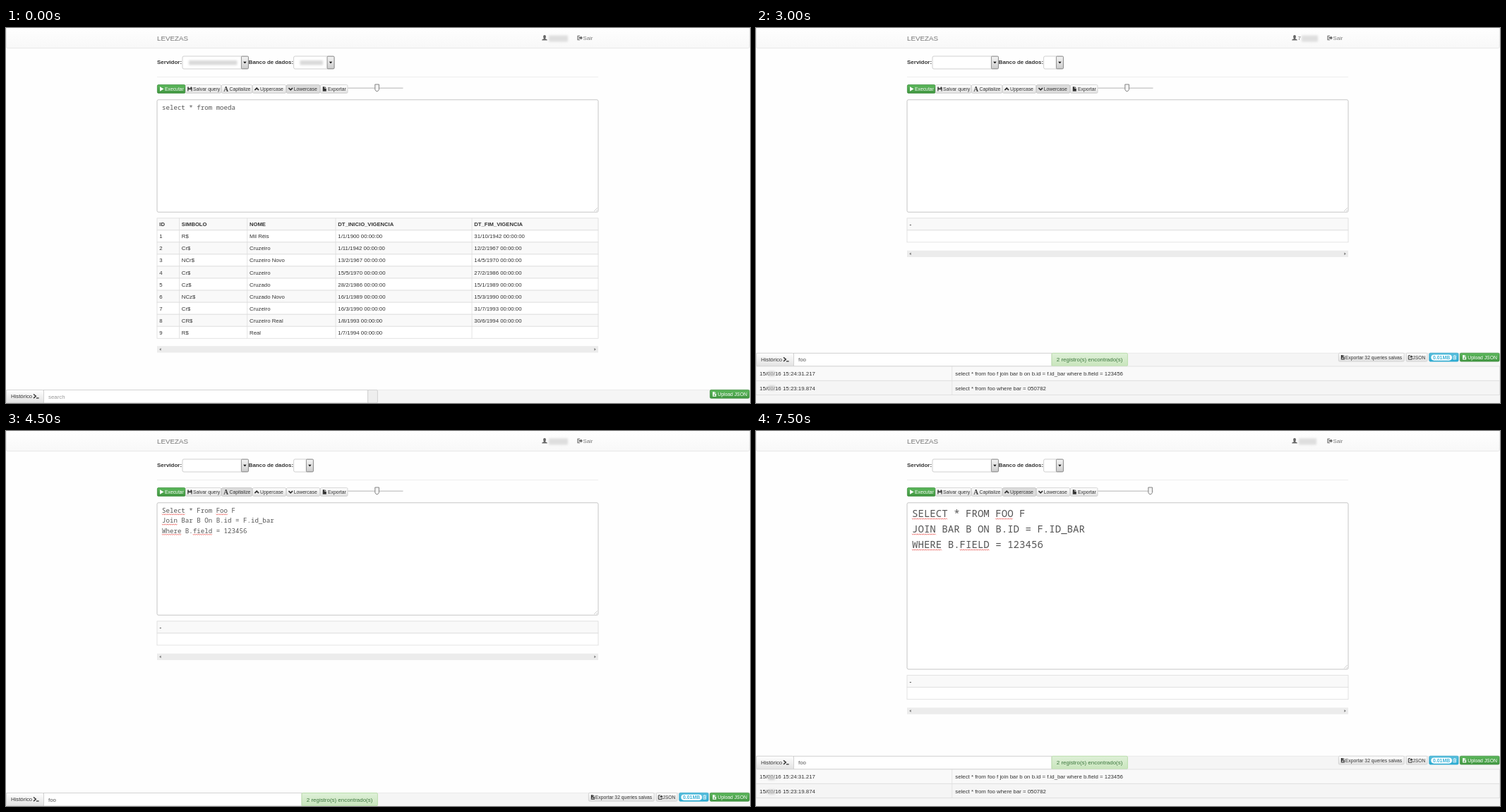
Recreate the animation shown at these times as an HTML page. Size 1054 by 532 pixels, loop 8 s.

```html
<!DOCTYPE html>
<html lang="pt">
<head>
<meta charset="utf-8">
<title>Consulta SQL</title>
<style>
html, body { margin: 0; width: 100%; height: 100%; overflow: hidden; background: #fefefe; }
svg { display: block; width: 100%; height: 100%; }
text { font-family: "Liberation Sans", Arial, sans-serif; }
.mono { font-family: "Noto Sans Mono", "DejaVu Sans Mono", monospace; }
.serif { font-family: "Liberation Serif", serif; }
</style>
</head>
<body>
<svg id="stage" viewBox="0 0 1054 532" preserveAspectRatio="none">
  <defs id="defs"></defs>
  <g id="view"></g>
</svg>
<script>
const LOOP = 8000, STEP = 1500;
const INK = '#333', LINE = '#ddd';

const GRADIENTS = {
  nav: ['#ffffff', '#f8f8f8'], plain: ['#ffffff', '#e2e2e2'],
  green: ['#5cb85c', '#419641'], blue: ['#5bc0de', '#2aabd2'],
  warn: ['#fcf8e3', '#f8efc0'], ok: ['#dff0d8', '#c8e5bc'], arrow: ['#f4f4f4', '#cccccc']
};
document.getElementById('defs').innerHTML =
  Object.entries(GRADIENTS).map(([id, [a, b]]) =>
    `<linearGradient id="${id}" x2="0" y2="1"><stop stop-color="${a}"/><stop offset="1" stop-color="${b}"/></linearGradient>`).join('') +
  '<filter id="soft" x="-20%" y="-50%" width="140%" height="200%"><feGaussianBlur stdDeviation="1.6"/></filter>';

const grad = id => `url(#${id})`;

const box = (x, y, x2, y2, fill, stroke = 'none', r = 0, w = 0.8) =>
  `<rect x="${x}" y="${y}" width="${x2 - x}" height="${y2 - y}" rx="${r}" fill="${fill}" stroke="${stroke}" stroke-width="${w}"/>`;

const path = (d, stroke, w = 1, fill = 'none') =>
  `<path d="${d}" stroke="${stroke}" stroke-width="${w}" fill="${fill}"/>`;

const shape = (d, fill) => `<path d="${d}" fill="${fill}" fill-rule="evenodd"/>`;

const at = (x, y, art) => `<g transform="translate(${x} ${y})">${art}</g>`;

// y is the middle of the capitals
const label = (x, y, s, size = 7.85, fill = INK, extra = '') =>
  `<text x="${x}" y="${y + size * 0.36}" font-size="${size}" fill="${fill}" ${extra}>${s}</text>`;

const bold = (x, y, s, size) => label(x, y, s, size, INK, 'font-weight="bold"');

const smudge = (x, y, x2, y2, fill) =>
  `<rect x="${x}" y="${y}" width="${x2 - x}" height="${y2 - y}" fill="${fill}" filter="url(#soft)"/>`;

// icons are centred on 0,0
const icon = {
  play: c => shape('M-2.6-3.2L3 0L-2.6 3.2Z', c),
  save: c => shape('M-3.2-3H2.4L3.2-2.2V3H-3.2ZM-1.6-3V-.9H1.6V-3ZM-2 .8V3H2V.8Z', c) + box(.3, -2.7, 1.2, -1.2, c),
  letter: c => `<text class="serif" x="-3.4" y="3" font-size="9.4" font-weight="bold" fill="${c}">A</text>`,
  up: c => path('M-2.8 1.6L0-1.2L2.8 1.6', c, 1.7),
  down: c => path('M-2.8-1.4L0 1.4L2.8-1.4', c, 1.7),
  file: c => shape('M-2.5-3.2H.2V-.6H2.6V3.2H-2.5ZM.8-3.2L2.6-1.2H.8Z', c),
  sheet: (c, mark) => icon.file(c) + path('M-1.5 2L0 .3L1.5 2M0 .5V2.5', mark, .8),
  user: c => shape('M-1.9-1.8A1.9 2.2 0 0 1 1.9-1.8C1.9-.4 1.3.3.9.9L3.7 2.4V3.6H-3.7V2.4L-.9.9C-1.3.3-1.9-.4-1.9-1.8Z', c),
  exit: c => path('M0-2.8H-3V2.8H0', c, 1.1) + shape('M-1.4-.9H1V-2.7L4 0L1 2.7V.9H-1.4Z', c),
  share: c => path('M.2-2.6H-2.7V2.8H2.2V1', c, 1) + shape('M-1.2 1C-1-1 .2-1.7 1.2-1.7V-3L3.6-1L1.2 1V-.3C.2-.3-.6 0-1.2 1Z', c),
  trash: c => path('M-2.5-2H2.5M-1-2.7H1M-1.9-1.4V2.8H1.9V-1.4M-.6-1V2M.7-1V2', c, .8),
  prompt: c => path('M-3.6-2.9L-.3-.1L-3.6 2.7', c, 1.4) + path('M.2 2.6H4', c, 1.3)
};

function button(x, x2, y, skin, art, textX, s, ink = INK) {
  const [fill, edge] = {
    plain: [grad('plain'), '#ccc'], active: ['#dcdcdc', '#c2c2c2'],
    green: [grad('green'), '#3e8f3e'], blue: [grad('blue'), '#28a4c9']
  }[skin];
  return box(x + .4, y, x2 - .4, y + 11.8, fill, edge, 1.5) + art + label(textX, y + 6, s, 6.8, ink);
}

function select(x, x2, blur) {
  const bx = x2 - 10;
  return box(x, 40, x2, 58, '#fff', '#c4c4c4', 2) +
    box(bx, 40.2, x2, 57.8, grad('arrow'), '#777', 1) +
    shape(`M${bx + 2.8} 47.8H${x2 - 2.8}L${x2 - 5} 50.6Z`, '#111') +
    (blur ? smudge(x + 9, 46, bx - 6, 52.5, '#d9d9d9') : '');
}

function header(sc) {
  const [ux, ux2] = sc.user;
  return box(.4, -3, 1053.4, 28.5, grad('nav'), '#e4e4e4', 2) +
    label(214, 14.6, 'LEVEZAS', 9.8, '#777') +
    at(763, 14, icon.user('#666')) +
    (sc.digit ? label(767.5, 14.3, sc.digit, 7.85, '#777') : '') +
    smudge(ux, 10.5, ux2, 19.5, '#dedede') +
    at(813, 14, icon.exit('#666')) + label(817.5, 14.3, 'Sair', 7.85, '#777') +
    bold(214, 48.5, 'Servidor:', 8) + bold(343.8, 48.5, 'Banco de dados:', 7.85) +
    select(250, 343.4, sc.server) + select(407.6, sc.server ? 465 : 435.4, sc.server) +
    path('M214 69.5H839', '#eee');
}

function toolbar(sc) {
  const y = 80.6, mid = 86.5;
  const tools = [
    [254, 305, 'save', 260.4, 265, 'Salvar query'],
    [305, 349, 'letter', 311.6, 316.5, 'Capitalize'],
    [349, 397, 'up', 355.2, 360, 'Uppercase'],
    [397, 445, 'down', 403.2, 407.8, 'Lowercase'],
    [445, 484.4, 'file', 451.2, 456, 'Exportar']
  ];
  return button(214, 254.4, y, 'green', at(220.6, mid, icon.play('#fff')), 225, 'Executar', '#fff') +
    tools.map(([x, x2, pic, px, tx, s]) =>
      button(x, x2, y, sc.active.includes(s) ? 'active' : 'plain', at(px, mid, icon[pic](INK)), tx, s)).join('') +
    path('M484.5 85.2H562.5', '#b4b4b4', 1) +
    shape(`M${sc.knob - 2.8} 80H${sc.knob + 2.8}V87.6L${sc.knob + 1} 89.8H${sc.knob - 1}L${sc.knob - 2.8} 87.6Z`, '#f4f4f4') +
    path(`M${sc.knob - 2.8} 80H${sc.knob + 2.8}V87.6L${sc.knob + 1} 89.8H${sc.knob - 1}L${sc.knob - 2.8} 87.6Z`, '#777', .9);
}

function squiggle(x, x2, y) {
  let d = `M${x} ${y}`;
  for (let i = 1, px = x + 1.35; px <= x2; i++, px += 1.35) d += `L${px.toFixed(2)} ${y + (i % 2 ? 1.5 : 0)}`;
  return path(d, '#e8534f', .75);
}

function editor(sc) {
  const big = sc.zoom, size = big ? 14.08 : 9.13, adv = size * .6;
  const first = big ? 121.8 : 116.2, pitch = big ? 22 : 14.25, bottom = sc.bottom;
  let out = box(214, 101.8, 839, bottom, '#fff', '#c6c6c6', 2, 1) +
    path(`M833 ${bottom - 1.2}L837.8 ${bottom - 6}M836 ${bottom - 1.2}L837.8 ${bottom - 3}`, '#bbb', .7);
  sc.code.forEach((line, row) => {
    const y = first + row * pitch;
    out += `<text class="mono" x="221" y="${y}" font-size="${size}" fill="#555">${line}</text>`;
    for (const m of line.matchAll(/[a-z]+/gi)) {
      if (sc.spell && /^(select|foo|where|join|field)$/i.test(m[0]))
        out += squiggle(221 + m.index * adv, 221 + (m.index + m[0].length) * adv, y + (big ? 2 : 1.4));
    }
  });
  return out;
}

const COINS = [
  ['ID', 'SIMBOLO', 'NOME', 'DT_INICIO_VIGENCIA', 'DT_FIM_VIGENCIA'],
  ['R$', 'Mil Réis', '1/1/1900', '31/10/1942'],
  ['Cr$', 'Cruzeiro', '1/11/1942', '12/2/1967'],
  ['NCr$', 'Cruzeiro Novo', '13/2/1967', '14/5/1970'],
  ['Cr$', 'Cruzeiro', '15/5/1970', '27/2/1986'],
  ['Cz$', 'Cruzado', '28/2/1986', '15/1/1989'],
  ['NCz$', 'Cruzado Novo', '16/1/1989', '15/3/1990'],
  ['Cr$', 'Cruzeiro', '16/3/1990', '31/7/1993'],
  ['CR$', 'Cruzeiro Real', '1/8/1993', '30/6/1994'],
  ['R$', 'Real', '1/7/1994', '']
];
const COLS = [214, 245.5, 341.7, 467, 660];

function table(sc) {
  const top = sc.bottom + 8.6, h = 17.05, rows = sc.table ? COINS.length : 2, end = top + rows * h;
  let out = '';
  for (let i = 0; i < rows; i++) {
    const y = top + i * h;
    out += box(214, y, 839, y + h, i % 2 ? '#fff' : '#f9f9f9', LINE);
    if (!sc.table) continue;
    const cells = i ? [i, ...COINS[i].map((s, k) => k > 1 && s ? s + ' 00:00:00' : s)] : COINS[0];
    cells.forEach((s, k) => out += (i ? label : bold)(COLS[k] + 3.3, y + h / 2 + .2, s, i ? 7.8 : 7.65));
  }
  if (sc.table) out += path(COLS.slice(1).map(x => `M${x} ${top}V${end}`).join(''), LINE, .8);
  else out += bold(217.4, top + 8.6, '-', 7.8);
  const bar = end + (sc.table ? 11 : 11.8), mid = bar + 4.6;
  return out + box(214, bar, 839, bar + 9.2, '#ececec') +
    shape(`M219.6 ${mid - 1.9}V${mid + 1.9}L217.2 ${mid}ZM833.4 ${mid - 1.9}V${mid + 1.9}L835.8 ${mid}Z`, '#777');
}

function history(sc) {
  const y = sc.open ? 461.3 : 513.5, mid = y + 9.2, small = y + 6;
  const [split, msg, skin, edge, ink] = sc.note;
  let out = box(0, y, 1054, 532, '#f5f5f5') + path(`M0 ${y}H1054`, '#e6e6e6', .8) +
    box(.4, y, 53.5, y + 18.4, grad('plain'), '#ccc', 2) +
    label(7, mid, 'Histórico', 7.75) + at(42.6, mid - .3, icon.prompt(INK)) +
    box(53.5, y, split, y + 18.4, '#fff', '#ccc') +
    label(60, mid, sc.find || 'search', 7.9, sc.find ? '#555' : '#999') +
    box(split, y, 526.4, y + 18.4, skin, edge, 1.5) +
    label(split + 6.8, mid, msg, sc.find ? 7.95 : 7.78, ink);
  if (sc.saved) {
    out += button(825, 918.6, y - .1, 'plain', at(831.3, small, icon.sheet(INK, '#fff')), 834.8, `Exportar ${sc.saved} queries salvas`) +
      button(920.8, 951.4, y - .1, 'plain', at(927, small, icon.share(INK)), 930.3, 'JSON') +
      button(953.4, 995.4, y - .1, 'blue', box(956.4, y + 2.2, 986, y + 10.4, '#fff', 'none', 4.1) +
        label(959, small + .3, '0.01MB', 6.9, '#3db3d8', 'font-weight="bold"') +
        at(989.8, small, icon.trash('#e4f5fb')), 0, '');
  }
  out += button(997, 1053.4, y - .1, 'green', at(1003.6, small, icon.sheet('#fff', '#449d44')), 1008.3, 'Upload JSON', '#fff');
  if (sc.open) {
    const logs = [
      ['15:24:31.217', 'select * from foo f join bar b on b.id = f.id_bar where b.field = 123456'],
      ['15:23:19.874', 'select * from foo where bar = 050782']
    ];
    logs.forEach(([time, query], i) => {
      const top = 480 + i * 20.3, c = top + 10.4;
      out += box(0, top, 1053.4, top + 20.3, i ? '#f5f5f5' : '#f9f9f9', LINE) +
        path(`M277.7 ${top}V${top + 20.3}`, LINE, .8) +
        label(5, c, '15/00/16 ' + time, 7.9) +
        smudge(17.5, c - 3 + sc.blurDrop, 26.5, c + 3 + sc.blurDrop, '#c6c6c6') +
        label(282.3, c, query, 7.83);
    });
  }
  return out;
}

const QUERY = ['Select * From Foo F', 'Join Bar B On B.id = F.id_bar', 'Where B.field = 123456'];
const UPPER = QUERY.map(s => s.toUpperCase());
const NOTES = {
  none: [512.6, '', '#eee', '#ccc', INK],
  many: [320, 'Mostrando 20 de 30 encontrados. Seja mais específico.', grad('warn'), '#f5e79e', '#8a6d3b'],
  two: [419, '2 registro(s) encontrado(s)', grad('ok'), '#b2dba1', '#3c763d']
};
const BASE = { bottom: 261.2, knob: 525.6, code: [], user: [769, 796], active: ['Lowercase'], note: NOTES.none, blurDrop: 0 };
const FOUND = { ...BASE, find: 'foo', note: NOTES.two, saved: 32, spell: true };
const SCENES = [
  { ...BASE, server: true, table: true, code: ['select * from moeda'] },
  { ...BASE, server: true, spell: true, saved: 30, note: NOTES.many,
    active: ['Lowercase', 'Salvar query'], code: ['select * from foo where bar = 050782'] },
  { ...FOUND, open: true, digit: '7', user: [773, 796] },
  { ...FOUND, active: ['Capitalize'], code: QUERY },
  { ...FOUND, active: ['Uppercase'], code: UPPER, user: [769, 795] },
  { ...FOUND, active: ['Uppercase'], code: UPPER, user: [769, 794], open: true, blurDrop: 1.4,
    zoom: true, knob: 558.6, bottom: 338 }
];

const view = document.getElementById('view');
let shown = -1;

function render(t) {
  const i = Math.floor((t % LOOP) / STEP);
  if (i === shown) return;
  shown = i;
  const sc = SCENES[i];
  view.innerHTML = header(sc) + toolbar(sc) + editor(sc) + table(sc) + history(sc);
}

const start = performance.now();
function tick() {
  render(performance.now() - start);
  requestAnimationFrame(tick);
}
tick();
</script>
</body>
</html>
```
